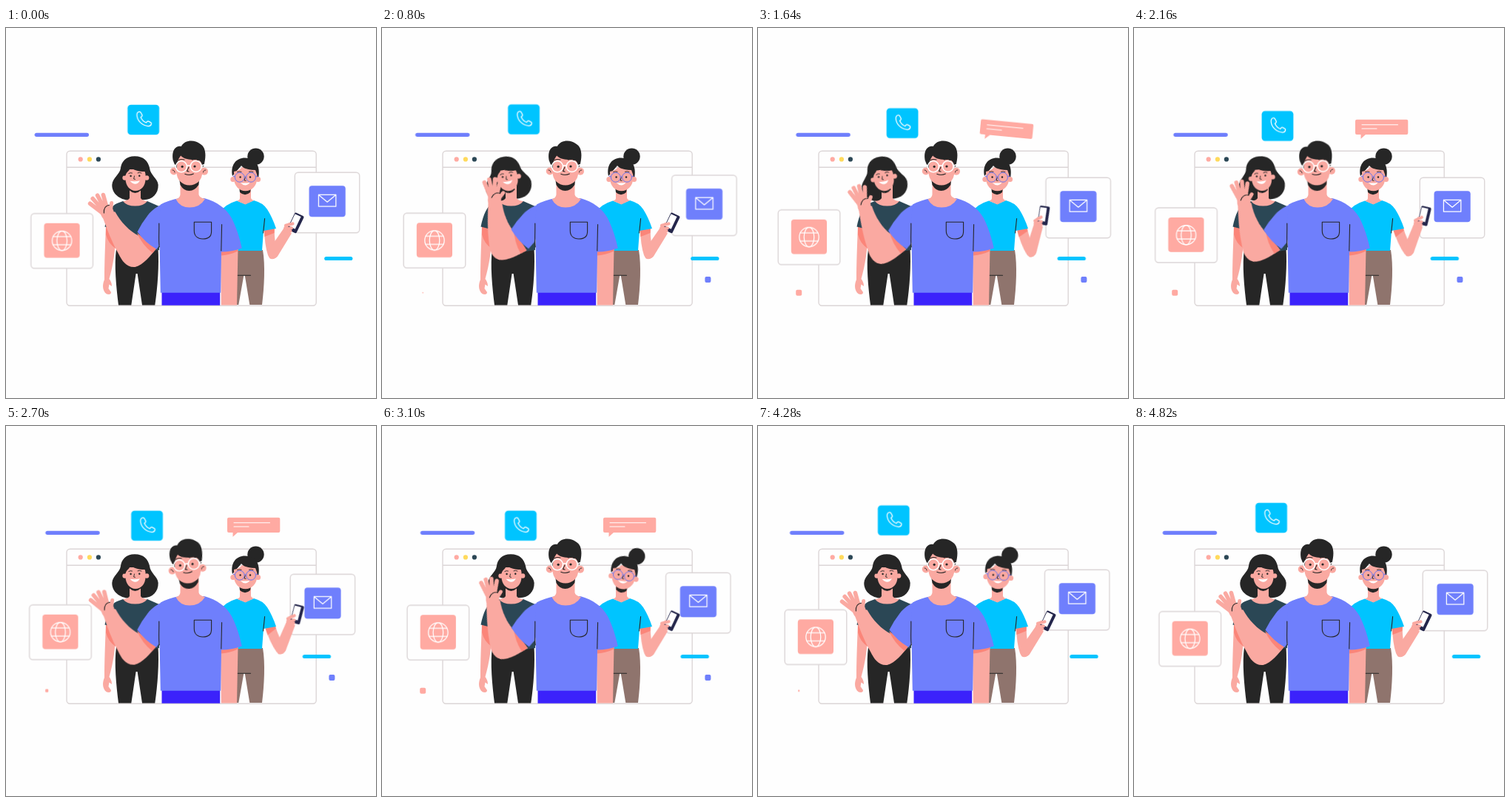
An HTML page for the animation above (4840 ms loop, 500 px wide and 500 px high).

```html
<!DOCTYPE html>
<html lang="en">
<head>
<meta charset="utf-8">
<title>Team</title>
<style>
  html, body { margin: 0; width: 100%; height: 100%; overflow: hidden; background: #fefefe; }
  svg { display: block; width: 100%; height: 100%; }

  :root {
    --loop: 4840ms;
    --sine: cubic-bezier(.364, 0, .636, 1);
  }

  .skin { fill: #faa9a1; }
  .pink { fill: #ffaaa2; }
  .shade { fill: #fb8579; }
  .dark { fill: #262626; }
  .teal { fill: #2b4755; }
  .blue { fill: #6f7ffc; }
  .cyan { fill: #00c4ff; }
  .frame { fill: #fefefe; stroke: #dcd6d7; stroke-width: 1.4; }
  .ink, .icon, .limb { fill: none; stroke-linecap: round; stroke-linejoin: round; }
  .ink { stroke: #262626; stroke-width: 1.1; }
  .icon { stroke: #fff; stroke-width: 1.25; }
  .limb { stroke: #faa9a1; }
  .fine { stroke-width: .9; }

  .orbit, .slide, .pop, .turn { animation: var(--loop) var(--sine) infinite; }

  .orbit { animation-name: orbit; animation-timing-function: linear; animation-delay: var(--from); }
  @keyframes orbit {
    from { transform: rotate(0deg) translateX(var(--r)) rotate(0deg); }
    to { transform: rotate(360deg) translateX(var(--r)) rotate(-360deg); }
  }

  .slide { animation: slide 2420ms cubic-bezier(.33, .36, .62, 1) infinite alternate; }
  @keyframes slide { to { transform: translateX(var(--dx)); } }

  .pink-dot { animation-name: pink-dot; transform-origin: 55.2px 357.7px; }
  @keyframes pink-dot {
    0%, 14.5%, 52.5%, 92%, 100% { transform: scale(0); }
    22%, 47%, 59%, 82% { transform: scale(1); }
  }
  .blue-dot { animation-name: blue-dot; transform-origin: 440.4px 340.1px; }
  @keyframes blue-dot {
    0%, 6%, 81%, 100% { transform: scale(0); }
    14.5%, 74% { transform: scale(1); }
  }
  .bubble { animation-name: bubble; transform-origin: 307px 149px; }
  @keyframes bubble {
    0%, 22%, 88%, 100% { transform: scale(0) rotate(15deg); }
    33.9% { transform: scale(1) rotate(5.5deg); }
    42%, 74% { transform: scale(1) rotate(0deg); }
    78.5% { transform: scale(.94) rotate(1.6deg); }
  }

  .wave { animation-name: wave; }
  @keyframes wave {
    0%, 27.7%, 53.7%, 83.7%, 100% { transform: rotate(0deg); }
    15.5%, 40.5%, 67.8% { transform: rotate(var(--a)); }
  }
  .sleeve { --a: 6deg; transform-origin: 208px 245px; }
  .forearm { --a: 17deg; transform-origin: 187px 290px; }
  .hand { --a: 8deg; transform-origin: 138px 253px; }

  .head-left { animation-name: head-left; transform-origin: 174px 234px; }
  @keyframes head-left {
    0%, 5%, 52%, 100% { transform: rotate(0deg); }
    16.5%, 37% { transform: rotate(-9.5deg); }
  }
  .head-mid { animation-name: head-mid; transform-origin: 248px 217px; }
  @keyframes head-mid {
    0%, 40%, 63.5%, 100% { transform: rotate(0deg); }
    50%, 56% { transform: rotate(-5.5deg); }
  }
  .head-right { animation-name: head-right; transform-origin: 323px 224px; }
  @keyframes head-right {
    0%, 56.5%, 93%, 100% { transform: rotate(0deg); }
    69%, 80% { transform: rotate(12deg); }
  }
  .arm-up { animation-name: arm-up; transform-origin: 353px 268px; }
  @keyframes arm-up {
    0%, 20%, 65%, 100% { transform: rotate(0deg); }
    40%, 56% { transform: rotate(-17deg); }
  }
  .arm-low { animation-name: arm-low; transform-origin: 361px 305px; }
  @keyframes arm-low {
    0%, 20%, 65%, 100% { transform: rotate(0deg); }
    33% { transform: rotate(-4deg); }
    48%, 56% { transform: rotate(6deg); }
  }
</style>
</head>
<body>
<svg viewBox="0 0 500 500">
  <!-- window -->
  <rect class="frame" x="82" y="166.3" width="337.2" height="208.9" rx="4.5"/>
  <path d="M82 188.3H419" stroke="#dcd6d7" stroke-width="1.4"/>
  <circle class="pink" cx="100.7" cy="177.4" r="3.1"/>
  <circle cx="112.9" cy="177.4" r="3.1" fill="#ffda5c"/>
  <circle class="teal" cx="124.9" cy="177.4" r="3.1"/>

  <!-- floating bits -->
  <path class="slide" style="--dx:15px" d="M41.2 144.3H109.4" stroke="#6f7ffc" stroke-width="5.2" stroke-linecap="round"/>
  <path class="slide" style="--dx:-30px" d="M432.8 311.5H465.8" stroke="#00c4ff" stroke-width="5.2" stroke-linecap="round"/>
  <rect class="pop pink-dot pink" x="51.2" y="353.7" width="8" height="8" rx="2"/>
  <rect class="pop blue-dot blue" x="436.4" y="336.1" width="8" height="8" rx="2"/>
  <g class="pop bubble">
    <path class="pink" d="M301 123.7H368.3Q370.3 123.7 370.3 125.7V142Q370.3 144 368.3 144H313L306.5 149.8V144H301Q299 144 299 142V125.7Q299 123.7 301 123.7Z"/>
    <path class="icon" style="stroke-width:1.1" d="M308 130.8H356.5M308 136H328"/>
  </g>

  <!-- tiles -->
  <g transform="translate(189.1 128.9)">
    <g class="orbit" style="--r:6px;--from:-3160ms">
      <rect class="cyan" x="-21.4" y="-20.3" width="42.8" height="40.6" rx="4.5"/>
      <path class="icon" transform="translate(.8 -1)" d="M-9.6 -5.5C-9.6 -8 -8 -9.6 -6.2 -9.8C-5 -9.9 -4.4 -9 -3.8 -7.8L-2.6 -5.4C-2 -4 -2.8 -3.2 -4.4 -2.4C-3 1 0 4 3 5C4 3.2 4.8 2.4 6.2 3.1L8.6 4.4C9.8 5 10.2 5.8 9.9 6.8C9.2 9 7.4 9.9 5.4 9.6C-2.6 8.6 -9.4 2.4 -9.6 -5.5Z"/>
    </g>
  </g>
  <g transform="translate(73.7 283.4)">
    <g class="orbit" style="--r:4.7px;--from:-890ms">
      <rect class="frame" x="-41.8" y="-37" width="83.6" height="74" rx="4.5"/>
      <rect class="pink" x="-24.2" y="-24" width="48.2" height="46.8" rx="4"/>
      <g class="icon">
        <circle cx="0" cy="-.3" r="13.2"/>
        <ellipse cx="0" cy="-.3" rx="6.8" ry="13.2"/>
        <path d="M-12 -5.8H12M-12 5.2H12"/>
      </g>
    </g>
  </g>
  <g transform="translate(431.4 239.1)">
    <g class="orbit" style="--r:4.1px;--from:-4160ms">
      <rect class="frame" x="-43.7" y="-40.8" width="87.4" height="81.6" rx="4.5"/>
      <rect class="blue" x="-24.5" y="-22.8" width="49.2" height="42" rx="4"/>
      <path class="icon" d="M-11.6 -10.6H11.8V5.2H-11.6ZL.1 -.8L11.8 -10.6"/>
    </g>
  </g>

  <!-- left woman -->
  <path class="skin" d="M135 266C134 295 133 318 133 340C130 347 130 355 136 359.5Q142 361 142 357L138.5 352L139.5 346.5L143 349C143 344 141 341 139.5 339C145 320 148 300 149 270Z"/>
  <path class="shade" d="M135 268L149 271L148 298Q138 291 135 279Z"/>
  <path class="dark" d="M149 299C146 320 149 350 152 374.5H169.3L175.6 332H177.6L184 374.5H201.3C205 350 207 320 205.5 298Z"/>
  <path class="teal" d="M158 234L191 234L207 241V300Q178 306 150 301L147 272L133.5 268.5C137 252 142 240 150 237Z"/>
  <g class="turn head-left">
    <path class="dark" d="M174 173.3C162 173.3 156 181 155 189C154 198 144 202 143.3 212C143 224 154 232 166 232.8L186 232.3C198 232 206 224 205.7 212C205 203 195 199 194 189C192 180 186 173.3 174 173.3Z"/>
  </g>
  <path class="skin" d="M167 213H182V230Q184 233.5 191 234Q186 240.6 174.5 240.6Q163 240.6 158 234Q165 233.5 167 230Z"/>
  <g class="turn head-left">
    <path class="dark" d="M167 216Q174.5 223 182 216V219.5Q174.5 226.5 167 219.5Z"/>
    <circle class="skin" cx="160.7" cy="202.5" r="3.3"/>
    <circle class="skin" cx="190" cy="202.5" r="3.3"/>
    <path class="skin" d="M161.5 191H188.5V204C188.5 214 182 220 175 220C167.5 220 161.5 213 161.5 204Z"/>
    <path class="dark" d="M159.5 200C157 183 165 174 174 174C186 174 192 184 190 200L187.5 194C179 194 172 192 168.5 188.5C166 194 162.5 195 161.5 199Z"/>
    <circle class="dark" cx="168.6" cy="200" r="1.2"/>
    <circle class="dark" cx="180.3" cy="199.7" r="1.2"/>
    <path class="ink fine" d="M165.8 196.5Q168 195 170.5 196M178 195.8Q180.5 194.7 183 196M173.5 200L172.6 204L174.5 204.4"/>
    <path d="M167.5 206.8Q174.5 208 181 206.2Q175.5 215 167.5 206.8Z" fill="#fff"/>
  </g>

  <!-- right woman -->
  <path d="M300 300H347C350.5 320 349 350 346 374H329.3L322.8 334.5H321.3L314.3 374H300Z" fill="#8f746d"/>
  <path class="ink" d="M312 334.2H330.5"/>
  <g class="turn arm-up">
    <path class="limb" stroke-width="13.5" d="M356 268Q355.5 290 360.5 305"/>
    <path class="shade" d="M349 273L363 270.5L362.5 277Q355 280 349.4 282Z"/>
    <g class="turn arm-low">
      <path class="skin" d="M355 300L375.5 270.5L386 277.5L367 308.5Q361 314.5 356 311Z"/>
      <path class="limb" stroke-width="11" d="M380.5 271.5L384.5 268.2"/>
      <g transform="translate(391.4 263.4) rotate(25.6)">
        <rect x="-6.8" y="-12.8" width="13.6" height="25.6" rx="1.8" fill="#24264b"/>
        <path d="M-6 -10.6H2.9V7.8H-6Z" fill="#fff"/>
      </g>
      <path class="limb" stroke-width="4.2" d="M378 266.8L387.5 264.5M381 271L385.8 270.3M381 275L384.5 274.4"/>
    </g>
  </g>
  <path class="cyan" d="M312 233.5L323 238L335 233Q347 236 353 245Q360 256 365 271L348 274L346 301H298L288 250Q296 238 312 233.5Z"/>
  <path class="ink" d="M349.6 257.5L347.6 277"/>
  <path class="skin" d="M316 212H331V230Q332 232.5 335 233L323.5 238.4L312 233.5Q316 232.5 316 230Z"/>
  <g class="turn head-right">
    <circle class="dark" cx="337.5" cy="173.6" r="11.2"/>
    <path class="dark" d="M306 200C303 185 311 175.5 323 175.5C337 176 344 185 341.3 202H334L318 186Z"/>
    <path class="dark" d="M315 214Q323 223 331.5 213L330 222Q323 228.5 316 222Z"/>
    <circle class="skin" cx="306.8" cy="204.5" r="3.5"/>
    <circle class="skin" cx="340.6" cy="204.5" r="3.5"/>
    <path class="skin" d="M308 194Q315 193 319 188Q327 192 337 192L339.2 198V203C339.2 213.5 332 220.3 323.6 220.3C315 220.3 308 213 308 203Z"/>
    <g fill="none" stroke="#6a74ee" stroke-width="1">
      <circle cx="315.8" cy="201.8" r="6.4"/>
      <circle cx="331" cy="201.8" r="6.4"/>
      <path d="M322.3 201Q323.4 200 324.5 201M309.3 201L306.5 200M337.5 201L340.5 200"/>
    </g>
    <circle class="dark" cx="316.6" cy="201.5" r="1.2"/>
    <circle class="dark" cx="330" cy="201.5" r="1.2"/>
    <path class="ink fine" d="M312.5 194.5Q315 193.3 318 194.2M328.5 194.2Q331.5 193.3 334 194.5M323.3 202L322 206L324.2 206.3"/>
    <path d="M316.5 209Q323 210.3 329.5 208.7Q324 216 316.5 209Z" fill="#fff"/>
  </g>

  <!-- man -->
  <path d="M210.5 357H289.2V374.8H210.5Z" fill="#3b22fb"/>
  <path class="skin" d="M290 298L313.5 297L312 374.5H290.8Z"/>
  <path class="shade" d="M291 301L313.4 298V301.5Q303 306.5 291 307.5Z"/>
  <g class="turn wave sleeve">
    <g class="turn wave forearm">
      <g class="turn wave hand">
        <path class="limb" stroke-width="5.6" d="M129 249L113.6 237.3M130 245L117.2 230.5M132.5 243L123.6 226.2M136 242L131.4 225.5"/>
        <path class="limb" stroke-width="5" d="M141 250L142.6 236.5"/>
        <path class="skin" d="M125.5 247Q126 237 134 237.5Q142 239 145 246Q148 255 143 260Q134 261 130 256Z"/>
        <path class="ink" d="M132.4 250Q131.8 240.5 139.5 239.3"/>
      </g>
      <path class="skin" d="M130 254Q138 246 147.5 248.5C155 262 167 275 180 281L204 297C195 308 186 320 174.5 323C163 324 157 315 152 305C143 289 137 273 130 254Z"/>
      <path class="shade" d="M177 277L204 297L198 304Q184 293 177 277Z"/>
    </g>
    <path class="blue" d="M232 231C210 236 198 244 191 254Q183 264 177.5 275.5Q188 290 203.5 299L210 290L225 250Z"/>
  </g>
  <path class="blue" d="M234 230H268C285 235 297 243 305 257C312 271 316 285 318.8 297.5Q305 302.5 291 302.5L290.2 357.8H208.8L207 262L209 238.5Q220 232.5 234 230Z"/>
  <path class="ink" d="M206.8 264C207 280 206 288 207.3 296M291.6 265.5L290.8 301M254.3 262.2H277.6V275C277.6 282 272.5 285 266 285C259 284.8 254.3 281 254.3 274Z"/>
  <path class="skin" d="M235.5 205H260.5V225Q261 229 269 231Q262 242.6 248 242.6Q235 242.6 229.5 231.3Q235 230 235.5 225Z"/>
  <g class="turn head-mid">
    <path class="dark" d="M234 203H261.5L260.3 212Q255 220 247.5 220Q240 220 235.5 212Z"/>
    <circle class="skin" cx="226.8" cy="193.5" r="5"/>
    <circle class="skin" cx="268" cy="193.8" r="5"/>
    <path class="ink fine" d="M225 192Q227.5 191.5 228 195M269.8 192Q267 191.6 266.5 195"/>
    <path class="skin" d="M230.5 172H265.2V195C265.2 206 257 212.5 248 212.5C238 212.5 230.5 205 230.5 195Z"/>
    <path class="dark" d="M229.6 189L225.6 178.5C223.5 167.5 228 158.5 236.8 160C241 151.5 254 150.3 262.2 156.5C270.5 161 271 173 267 187.5L264.8 186C264.8 181 261.5 178.5 257 177.5C248 179 240 176.5 236.2 172.5C232 178 231 182 231 189Z"/>
    <g class="icon" style="stroke-width:1.6">
      <circle cx="237" cy="187.3" r="7.5"/>
      <circle cx="256.7" cy="187" r="7.5"/>
      <path d="M244.6 186.5Q246.8 185 249.1 186.5M229.5 186L226 184.5M264.2 186L268 184.8"/>
    </g>
    <circle class="dark" cx="238.2" cy="187.3" r="1.6"/>
    <circle class="dark" cx="255" cy="187" r="1.6"/>
    <path class="ink" d="M233 178.8Q236.5 176.8 241 178M251.5 178Q256 176.8 260 178.8M247 188L244.5 193.4L247.2 194M241.8 197.2Q247.5 200 253.4 197"/>
  </g>
</svg>
</body>
</html>
```
